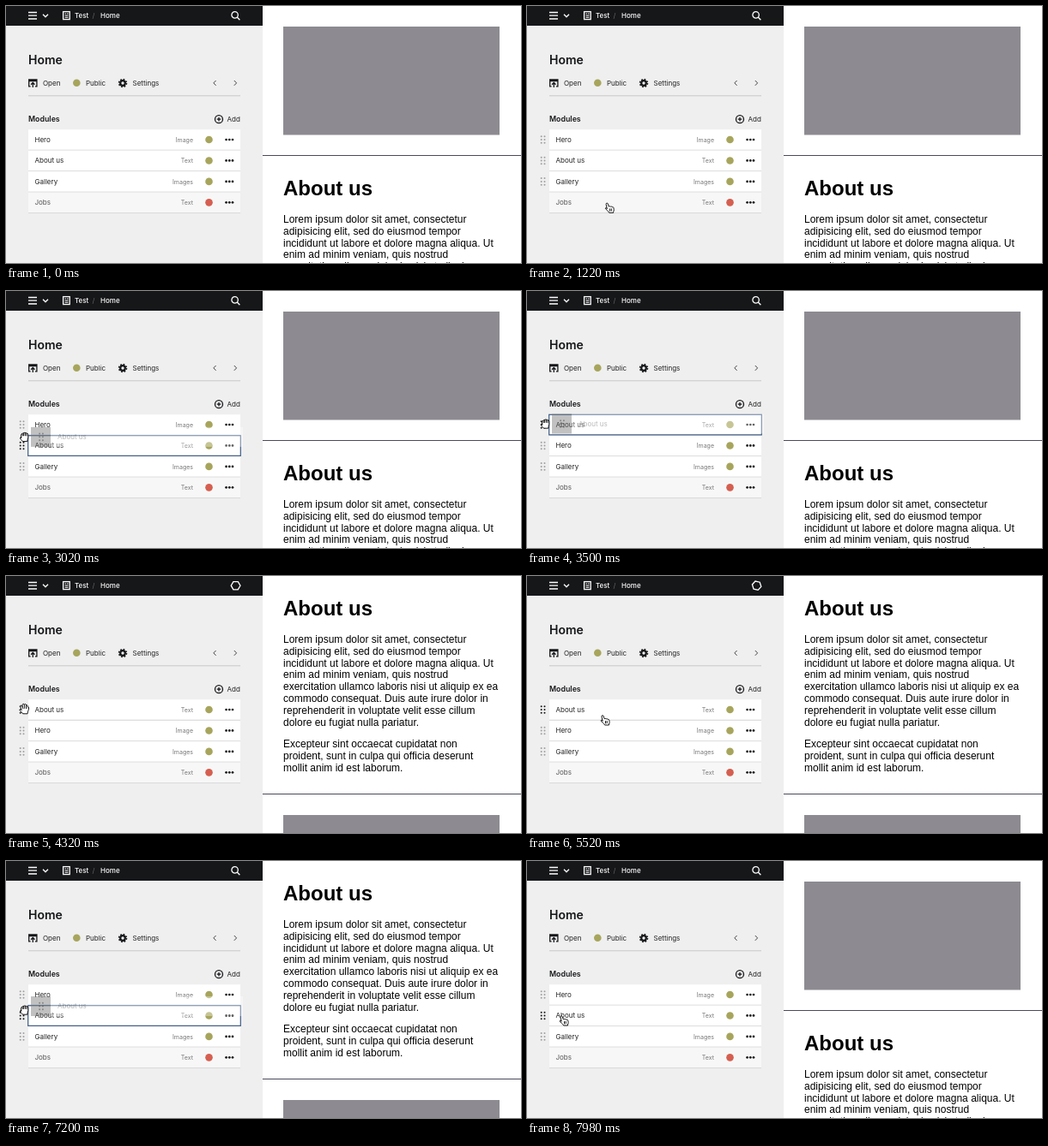
Animation of 600 by 300 pixels, one loop 8 s. Source, as an HTML page:

```html
<!DOCTYPE html>
<html lang="en">
<head>
<meta charset="utf-8">
<title>Sorting modules</title>
<style>
  html, body { margin: 0; width: 100%; height: 100%; overflow: hidden; background: #fff; }
  svg { display: block; width: 600px; height: 300px; }
  text { white-space: pre; }
  .ui { font: 8px Inter, Roboto, sans-serif; fill: #222; }
  .kind { font-size: 7px; fill: #777; text-anchor: end; }
  .bold { font-weight: 600; fill: #161719; }
  .page { font: 12px "Liberation Sans", Arial, sans-serif; fill: #000; }
  .page .title { font-size: 24px; font-weight: 700; }
  .line { fill: none; stroke-width: 1.3; }
  .hand { fill: #fff; stroke: #000; stroke-width: .9; stroke-linejoin: round; stroke-linecap: round; }
</style>
</head>
<body>
<svg viewBox="0 0 600 300">
  <defs>
    <clipPath id="left"><rect width="299" height="300"/></clipPath>
    <g id="dots"></g>
  </defs>

  <rect width="600" height="300" fill="#fff"/>
  <g class="page">
    <g id="hero">
      <rect x="323" y="24" width="252" height="126.5" fill="#8d8b91"/>
    </g>
    <g id="about"><text class="title" x="323" y="46">About us</text></g>
    <rect id="rule" x="299" width="301" height="1" fill="#4a4a5c"/>
  </g>

  <g clip-path="url(#left)" class="ui">
    <rect width="299" height="300" fill="#efefef"/>
    <rect width="299" height="23" fill="#161719"/>
    <g class="line" stroke="#fff">
      <path d="M26 7.5h10M26 11.2h10M26 15h10M43 9.8l3 3 3-3"/>
      <rect x="66.6" y="6.6" width="7.6" height="9"/>
      <path d="M68.5 9h1.6M71 9h1.6M68.5 11.2h4M68.5 13.3h4" stroke-width="1"/>
      <path id="search" d="M270.3 10.4a3.7 3.7 0 1 1-7.4 0a3.7 3.7 0 1 1 7.4 0M269.4 13.2l3 3"/>
      <path id="spinner" d="M5.4 0L2.7 4.6H-2.7L-5.4 0L-2.7-4.6H2.7Z"/>
    </g>
    <text x="80" y="14" fill="#fff" style="fill:#fff;font-weight:500">Test</text>
    <text x="100.5" y="14" style="fill:#666">/</text>
    <text x="110" y="14" style="fill:#fff;font-weight:500">Home</text>

    <text class="bold" x="26" y="68.3" style="font-size:14px">Home</text>
    <g class="line" stroke="#161719">
      <path d="M28.6 93.8H26.7V86h9.2v7.8H34M26.7 87.5h9.2M31.3 95v-5M29 91.8l2.3-2.3 2.3 2.3"/>
      <path d="M244.6 87l-2.8 2.9 2.8 2.9M265.8 87l2.8 2.9-2.8 2.9" stroke="#444" stroke-width="1"/>
      <circle cx="136" cy="90" r="2.8" stroke-width="2.2"/>
      <circle cx="136" cy="90" r="4.4" stroke-width="1.7" stroke-dasharray="1.73 1.73"/>
      <circle cx="248" cy="132.2" r="4.5"/>
      <path d="M245.7 132.2h4.6M248 129.9v4.6"/>
    </g>
    <circle cx="82.3" cy="89.8" r="4.3" fill="#a7a55c"/>
    <text x="43" y="92.8">Open</text>
    <text x="93" y="92.8">Public</text>
    <text x="147.5" y="92.8">Settings</text>
    <rect x="26" y="104.3" width="247" height="1" fill="#c8c8c8"/>
    <text class="bold" x="26" y="135.2" style="font-size:8.8px">Modules</text>
    <text x="257.6" y="135.2">Add</text>

    <g id="rows"></g>
    <g id="handles"></g>
    <g id="ghost">
      <rect x="52" y="-11.5" width="224" height="23" fill="#fff" opacity=".35"/>
      <rect x="29" y="-11.5" width="23" height="23" fill="#777" opacity=".45"/>
      <use href="#dots" x="41" fill="#555" opacity=".55"/>
      <text x="60" y="2.8" opacity=".3">About us</text>
    </g>
    <g id="cursor">
      <path id="arrow" d="M-3-6V5l2.5-2.3 1.7 3.8 1.7-.8L1.3 2H5z" stroke="#fff" stroke-width=".8"/>
      <path id="point" class="hand" d="M-3 .8L-4-3.9q-.1-1.3.9-1.4t1.3 1L-.9-1.3q1.3-.8 2 .2 1.3-.7 1.9.4 1.5-.4 1.8 1L5.1 2.4q.1 1.5-.7 2.6l.1 1H-.4q-.7-1.5-2.2-2.7Q-4.4 1.8-5 .8q.3-1.1 2 0zM.5 1.5v2.4M2.2 1.4v2.4"/>
      <path id="grab" class="hand" d="M-3 1.2L-4.2-2.4q-.2-1.4.9-1.5T-2-2.6L-1.8-4.6q.2-1.1 1.1-1.1T.4-4.6q.3-1 1.2-.9t1 1.4q1.2-.6 1.6.5l.1 1.7q1.1-.5 1.3.7Q5.5 1.5 4.5 3.2L4 5.8h-5.4Q-2.6 4-4.6 2.2-5.5 1-4.6.6q.8-.2 1.6.6zM-2-2.6l.8 2.3M.4-4.6V-.6M2.5-4v3.6"/>
      <path id="fist" class="hand" d="M-3.4 1V-2.2q.1-1.4 1.3-1.5.5-1.1 1.6-.9.6-.7 1.7-.2 1.3-.5 1.8.6 1.7-.2 1.8 1.4Q5.1.8 4.2 3L3.8 5.2h-5.4Q-2.4 3.8-4.3 2.2-5.2.5-3.4.2zM-2-3.6l.3 2.2M-.4-4.4v2.8M1.3-4.6v3M3-4v2.6"/>
    </g>
  </g>
</svg>
<script>
const LOOP = 8000, TOP = 156, PITCH = 24.45;
const $ = id => document.getElementById(id);
const make = (tag, parent, attrs, label) => {
  const el = document.createElementNS('http://www.w3.org/2000/svg', tag);
  for (const k in attrs) el.setAttribute(k, attrs[k]);
  if (label) el.textContent = label;
  parent.append(el);
  return el;
};
const show = (el, on) => el.style.display = on ? '' : 'none';
const move = (el, x, y) => el.setAttribute('transform', `translate(${x} ${y})`);
const within = (t, spans) => spans.some(([a, b]) => t >= a && t < b);

for (const x of [-1.9, 1.9]) for (const y of [-3.8, 0, 3.8])
  make('circle', $('dots'), { cx: x, cy: y, r: 1 });

const paragraphs = [
  [78, 'Lorem ipsum dolor sit amet, consectetur|adipisicing elit, sed do eiusmod tempor|incididunt ut labore et dolore magna aliqua. Ut|enim ad minim veniam, quis nostrud|exercitation ullamco laboris nisi ut aliquip ex ea|commodo consequat. Duis aute irure dolor in|reprehenderit in voluptate velit esse cillum|dolore eu fugiat nulla pariatur.'],
  [200.4, 'Excepteur sint occaecat cupidatat non|proident, sunt in culpa qui officia deserunt|mollit anim id est laborum.']
];
for (const [y, copy] of paragraphs)
  copy.split('|').forEach((s, i) => make('text', $('about'), { x: 323, y: y + i * 13.8 }, s));

function makeRow(name, kind, hidden) {
  const g = make('g', $('rows'), {});
  make('rect', g, { x: 26, y: -11, width: 247, height: 23.8, fill: '#d9d9d9' });
  make('rect', g, { x: 26, y: -11.8, width: 247, height: 23.5, fill: hidden ? '#f7f7f7' : '#fff' });
  make('text', g, { x: 33.5, y: 2.9, style: hidden ? 'fill:#555' : '' }, name);
  make('text', g, { x: 218, y: 2.7, class: 'kind' }, kind);
  make('circle', g, { cx: 236.5, cy: 0, r: 4.3, fill: hidden ? '#d55f50' : '#a7a55c' });
  for (const x of [256.6, 260.3, 264]) make('circle', g, { cx: x, cy: 0, r: 1.35, fill: '#111' });
  return g;
}
const hero = makeRow('Hero', 'Image');
const about = makeRow('About us', 'Text');
const gallery = makeRow('Gallery', 'Images');
const jobs = makeRow('Jobs', 'Text', true);
const outline = make('rect', about, {
  x: 25.7, y: -11.7, width: 247.6, height: 23.6, fill: 'none', stroke: '#3f5c85', 'stroke-width': 1.2
});
const rowY = i => TOP + i * PITCH;
const handles = [0, 1, 2].map(i =>
  make('use', $('handles'), { href: '#dots', x: 18.6, y: rowY(i) }));
move(gallery, 0, rowY(2));
move(jobs, 0, rowY(3));

// time, x, y
const path = [
  [600, 150, 312], [1110, 105, 246], [1500, 60, 192], [1900, 27, 181], [2080, 22, 180],
  [2780, 21, 180], [3350, 21, 155], [4400, 21, 155], [4950, 65, 163], [5400, 91, 168],
  [5600, 91, 168], [6020, 46, 162], [6320, 21, 160], [6720, 21, 160], [7200, 21, 174],
  [7420, 21, 184], [7640, 21, 184], [7940, 43, 186], [8000, 43, 186]
];
const drags = [[2780, 3700], [6720, 7500]];
const loads = [[3720, 6400], [7520, 7900]];

function cursorAt(t) {
  if (t <= path[0][0]) return path[0].slice(1);
  const i = path.findIndex(p => p[0] > t);
  const [t0, x0, y0] = path[i - 1], [t1, x1, y1] = path[i];
  const u = (t - t0) / (t1 - t0), e = u * u * (3 - 2 * u);
  return [x0 + (x1 - x0) * e, y0 + (y1 - y0) * e];
}

function render(t) {
  const [x, y] = cursorAt(t);
  const dragging = within(t, drags);
  const aboutFirst = within(t, [[3080, 7000]]);
  const pageSwapped = within(t, [[4000, 7720]]);
  const loading = within(t, loads);

  move(hero, 0, rowY(aboutFirst ? 1 : 0));
  move(about, 0, rowY(aboutFirst ? 0 : 1));
  show(outline, dragging);
  show($('ghost'), dragging);
  move($('ghost'), 0, t < 5000 ? y : y - 4.5);

  const inList = y < 242;
  const hovered = dragging ? (aboutFirst ? 0 : 1) : Math.floor((y - TOP) / PITCH + .5);
  show($('handles'), inList);
  handles.forEach((h, i) => h.setAttribute('fill', i === hovered ? '#161719' : '#a0a0a0'));

  move($('cursor'), x, y);
  show($('cursor'), t > 600);
  const shape = dragging ? 'fist' : !inList ? 'arrow' : x < 26 ? 'grab' : 'point';
  for (const id of ['arrow', 'point', 'grab', 'fist']) show($(id), id === shape);

  show($('search'), !loading);
  show($('spinner'), loading);
  $('spinner').setAttribute('transform', `translate(267.6 11.2) rotate(${(t - 4320) * .36})`);

  move($('hero'), 0, pageSwapped ? 255 : 0);
  move($('about'), 0, pageSwapped ? 0 : 175);
  $('rule').setAttribute('y', pageSwapped ? 254 : 174);
}

const start = performance.now();
(function tick() {
  render((performance.now() - start) % LOOP);
  requestAnimationFrame(tick);
})();
</script>
</body>
</html>
```
